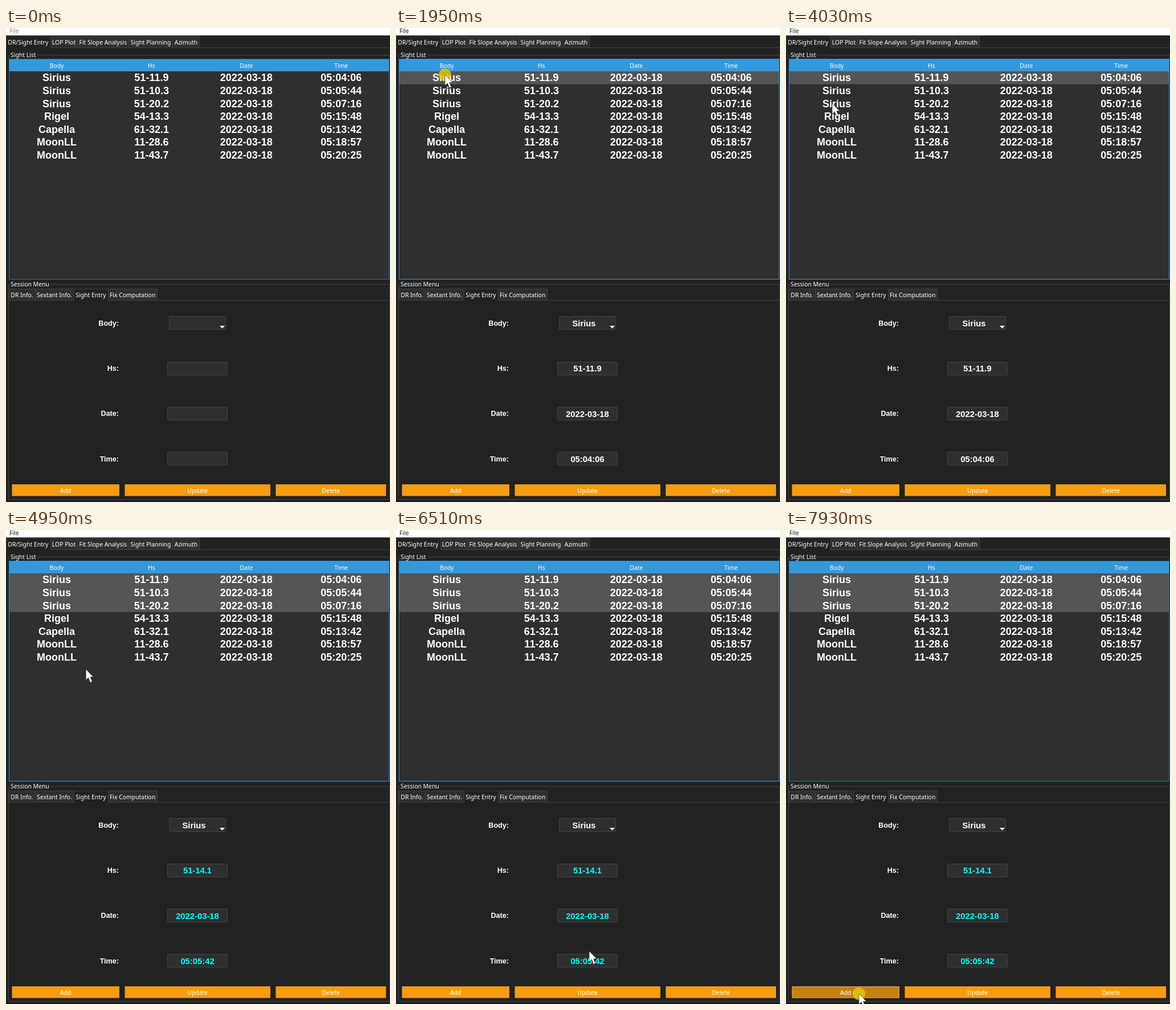
An HTML page for the animation above (8000 ms loop, 674 by 831 pixels).

```html
<!DOCTYPE html>
<html lang="en">
<head>
<meta charset="utf-8">
<title>Sight entry</title>
<style>
  html, body { margin: 0; width: 100%; height: 100%; overflow: hidden; background: #222; }
  svg { display: block; width: 100vw; height: 100vh; }
  text { font: 10.4px "Noto Sans", sans-serif; fill: #fff; text-anchor: middle; }
  .start { text-anchor: start; }
  .cell, .label, .value { font-family: "Liberation Sans", Arial, sans-serif; font-weight: bold; }
  .cell { font-size: 18px; }
  .label { font-size: 12.6px; text-anchor: end; }
  .value { font-size: 14.8px; }
</style>
</head>
<body>
<svg id="stage" viewBox="0 0 674 831" preserveAspectRatio="none"></svg>
<script>
const LOOP = 8000;
const stage = document.getElementById('stage');

function set(el, attrs) {
  for (const key in attrs) el.setAttribute(key, attrs[key]);
}
function add(tag, attrs, text) {
  const el = document.createElementNS('http://www.w3.org/2000/svg', tag);
  set(el, attrs);
  if (text) el.textContent = text;
  return stage.appendChild(el);
}
const rect = (x, y, width, height, fill, more) => add('rect', { x, y, width, height, fill, ...more });
const line = (d, stroke = '#444') => add('path', { d, stroke, fill: 'none' });
const label = (x, y, text, cls = '') => add('text', { x, y, class: cls }, text);
const show = (el, on) => set(el, { visibility: on ? 'visible' : 'hidden' });

// Each tab is as wide as its name plus padding
function tabs(left, top, names, selected) {
  const base = top + 20.5;
  line(`M${left} ${base}H673.5`);
  let x = left;
  names.forEach((name, i) => {
    const text = label(x + 3.3, top + 15, name, 'start');
    const next = x + text.getComputedTextLength() + 6.4;
    const edge = Math.round(x), width = Math.round(next) - edge;
    const on = i === selected;
    rect(edge + .5, top + .5, width, 20, on ? '#222' : '#2f2f2f', { stroke: on ? '#383838' : '#404040' });
    if (on) line(`M${edge + 1} ${base}h${width - 1}`, '#222');
    stage.append(text);
    x = next;
  });
}

// Window and menu
rect(0, 0, 674, 831, '#222');
rect(0, 0, 674, 13, '#fff');
const fileMenu = label(6, 9, 'File', 'start');
tabs(0, 14, ['DR/Sight Entry', 'LOP Plot', 'Fit Slope Analysis', 'Sight Planning', 'Azimuth'], 0);

// Sight list
const ROW = 22.6;
const columnX = i => 89 + i * 166.4;
line('M4.5 54V47.5H7M54 47.5H673.5V54');
label(8, 51, 'Sight List', 'start');
const listBox = rect(5.5, 54.5, 667, 386, '#2f2f2f');
rect(5.5, 55, 666.5, 21, '#3498db');
const selection = rect(6, 76, 666, ROW, '#555');
['Body', 'Hs', 'Date', 'Time'].forEach((name, i) => label(columnX(i), 70, name));
[
  'Sirius 51-11.9 2022-03-18 05:04:06',
  'Sirius 51-10.3 2022-03-18 05:05:44',
  'Sirius 51-20.2 2022-03-18 05:07:16',
  'Rigel 54-13.3 2022-03-18 05:15:48',
  'Capella 61-32.1 2022-03-18 05:13:42',
  'MoonLL 11-28.6 2022-03-18 05:18:57',
  'MoonLL 11-43.7 2022-03-18 05:20:25'
].forEach((sight, row) => sight.split(' ').forEach((text, i) =>
  label(columnX(i), 93.3 + row * ROW, text, 'cell')));

// Session form
line('M7 449.5H4.5V826.5H673.5V449.5H78');
label(8, 453, 'Session Menu', 'start');
tabs(5, 457, ['DR Info.', 'Sextant Info.', 'Sight Entry', 'Fix Computation'], 2);

const fields = ['Body:', 'Hs:', 'Date:', 'Time:'].map((name, i) => {
  const mid = 517.3 + i * 79.35;
  const top = Math.round(mid - 12) + .5;
  const [left, width] = i ? [283.5, 105] : [286.5, 99];
  label(198, mid + 4.2, name, 'label');
  const box = rect(left, top, width, 23, '#2f2f2f', { stroke: '#444', rx: 1 });
  return { top, box, value: label(i ? 336 : 330, mid + 5.5, '', 'value') };
});
add('path', { d: 'M375 522h9l-4.5 4.8Z', fill: '#fff' });

function button(left, right, name) {
  const box = rect(left, 800, right - left, 20.5, '#f59c12');
  label((left + right) / 2, 814.7, name);
  return box;
}
const addButton = button(10.5, 199, 'Add');
button(208.5, 464, 'Update');
button(473.5, 667, 'Delete');
const focusRing = rect(11, 800.5, 187.5, 19.5, 'none', { stroke: '#f6d9a8', 'stroke-dasharray': '1 1' });
rect(0, 830, 674, 1, '#171018');

// Pointer
const clickDot = add('circle', { r: 11, fill: '#e2cc0c', opacity: .8 });
const arrow = add('path', {
  d: 'M0 0V18.5L4.3 14.7L7.7 23L11 21.6L7.6 13.5H13Z',
  fill: '#fff', stroke: '#2a2a2a', 'stroke-width': .6
});
const beam = add('path', {
  d: 'M-3.5 -8H3.5M0 -8V8M-3.5 8H3.5',
  fill: 'none', stroke: '#fff', 'stroke-width': 1.3
});

// The pointer glides from stop to stop, seen once every STEP ms
const STEP = 70;
const ORIGIN = { x: 650, y: 850 };
const stops = [
  { start: 450, end: 930, x: 58, y: 218 },
  { start: 1000, end: 1210, x: 86, y: 102 },
  { start: 1280, end: 1680, x: 86, y: 82 },
  { start: 2940, end: 3440, x: 83, y: 121 },
  { start: 3640, end: 4030, x: 81, y: 132 },
  { start: 4950, end: 5440, x: 334, y: 611 },
  { start: 5510, end: 5720, x: 340, y: 596 },
  { start: 5980, end: 6720, x: 339, y: 756 },
  { start: 6910, end: 7130, x: 128, y: 838 },
  { start: 7330, end: 7460, x: 128, y: 813 }
];
const easeOut = u => u * (2 - u);

function pointerAt(t) {
  const next = stops.filter(stop => t >= stop.start).length;
  if (!next) return ORIGIN;
  const from = stops[next - 2] || ORIGIN, to = stops[next - 1];
  const span = to.end - to.start;
  const last = Math.round(span / STEP);
  const step = Math.floor((t - to.start) / span * last + .1);
  const k = easeOut(Math.min(1, (step + 1) / (last + 1)));
  return { x: from.x + (to.x - from.x) * k, y: from.y + (to.y - from.y) * k };
}

const PICK = 1950, AVERAGE = 4230, PRESS = 7930, CLICK = 130;

function draw(t) {
  const { x, y } = pointerAt(t);
  const picked = t >= PICK, averaged = t >= AVERAGE, pressed = t >= PRESS;
  const values = averaged ? ['Sirius', '51-14.1', '2022-03-18', '05:05:42']
    : picked ? ['Sirius', '51-11.9', '2022-03-18', '05:04:06'] : [];

  set(fileMenu, { style: `fill:${t < 1280 ? '#8a8a8a' : '#222'}` });
  set(listBox, { stroke: picked && !pressed ? '#3498db' : '#2a7596' });
  set(selection, { height: averaged ? ROW * 3 : ROW });
  show(selection, picked);

  let inField = false;
  fields.forEach((field, i) => {
    const over = i > 0 && x > 283 && x < 389 && y > field.top && y < field.top + 23;
    inField = inField || over;
    set(field.box, { stroke: over ? '#30506f' : '#444' });
    set(field.value, { style: `fill:${averaged && i ? '#0ff' : '#fff'}` });
    field.value.textContent = values[i] || '';
  });

  const overAdd = x > 10 && x < 199 && y > 800 && y < 821;
  set(addButton, { fill: pressed ? '#c98114' : overAdd ? '#dd8d13' : '#f59c12' });
  show(focusRing, pressed);

  [clickDot, arrow, beam].forEach(el => set(el, { transform: `translate(${x} ${y})` }));
  show(clickDot, [PICK, AVERAGE, PRESS].some(click => t >= click && t < click + CLICK));
  show(arrow, !inField);
  show(beam, inField);
}

const begin = performance.now();
function tick() {
  draw((performance.now() - begin) % LOOP);
  requestAnimationFrame(tick);
}
tick();
</script>
</body>
</html>
```
